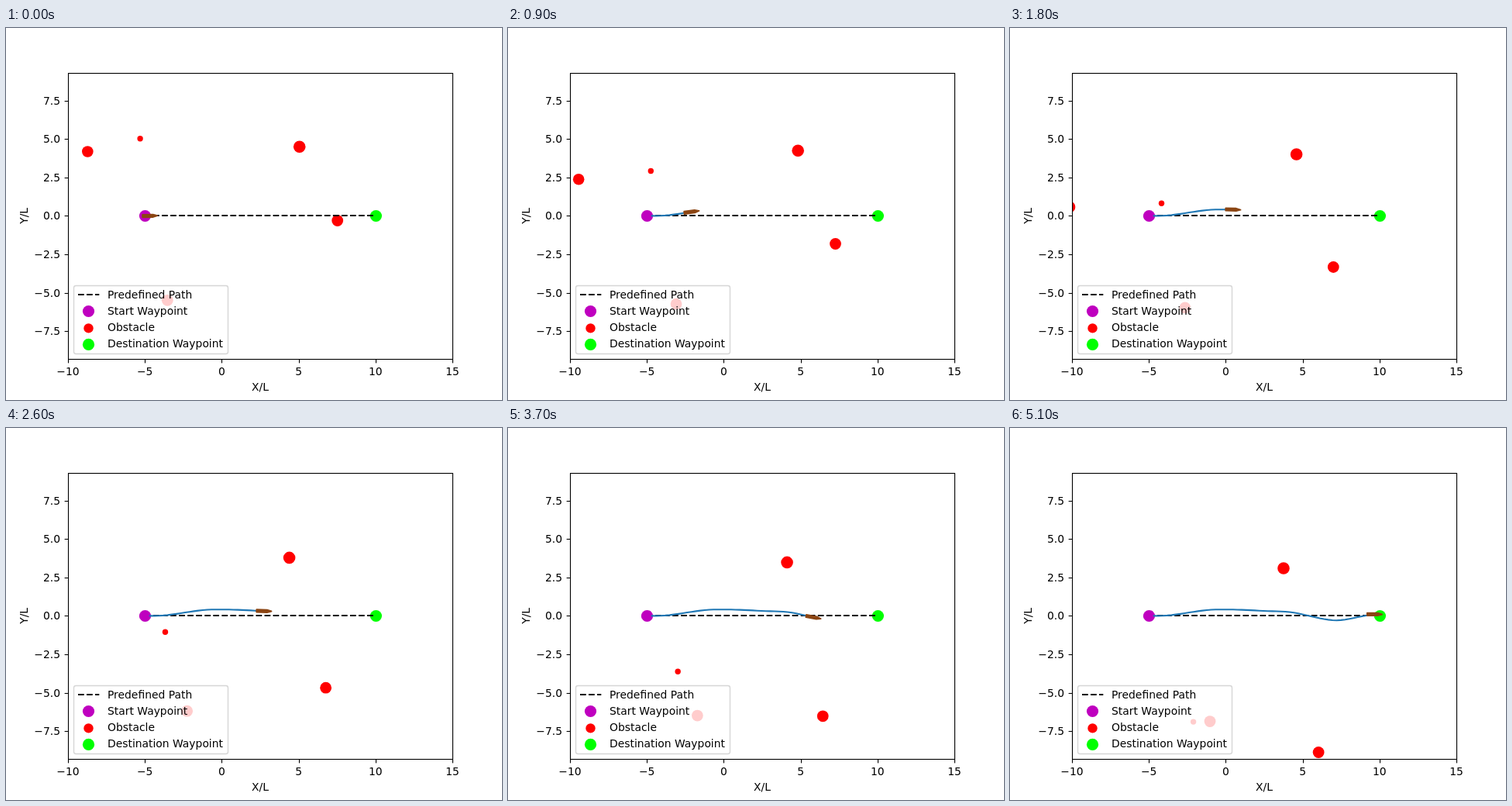
Animation of 640 by 480 pixels, one loop 5200 ms. Source, as an HTML page:

```html
<!DOCTYPE html>
<html lang="en">
<head>
<meta charset="utf-8">
<title>Path following with moving obstacles</title>
<style>
  html, body { margin: 0; width: 100%; height: 100%; overflow: hidden; background: #fff; }
  svg { display: block; width: 640px; height: 480px; }
  text { font: 13.889px "DejaVu Sans", sans-serif; fill: #000; }
  .mid { text-anchor: middle; }
  .end { text-anchor: end; }
  .line { fill: none; stroke: #000; stroke-width: 1.11; }
  .path { stroke: #000; stroke-width: 2.08; stroke-dasharray: 7.71 3.33; }
  .trail { fill: none; stroke: #1f77b4; stroke-width: 2.08; stroke-linejoin: round; stroke-linecap: square; }
  .hull { fill: #8b4513; stroke: #8b4513; stroke-width: 2; stroke-linejoin: round; }
</style>
</head>
<body>
<svg viewBox="0 0 640 480">
  <clipPath id="area"><rect x="80" y="57.6" width="496" height="369.6"/></clipPath>
  <g id="plot" clip-path="url(#area)"></g>
  <g id="axes"></g>
  <g id="legend"></g>
</svg>
<script>
const STEP = 100, STEPS = 52, UNIT = 19.84;
const RED = '#f00', PURPLE = '#bf00bf', GREEN = '#0f0';
const px = x => 278.4 + x * UNIT;
const py = y => 242.4 - y * UNIT;

// Steady drift, in pixels and pixels per step
const obstacles = [
  { x: 105.3, y: 159.5, r: 7.3, vx: -1.57, vy: 3.97 },
  { x: 173.1, y: 142.8, r: 3.7, vx: 1.245, vy: 4.633 },
  { x: 378.7, y: 153.3, r: 7.8, vx: -0.504, vy: 0.543 },
  { x: 427.7, y: 248.5, r: 7.4, vx: -0.58, vy: 3.333 },
  { x: 208.3, y: 351.3, r: 7.4, vx: 0.975, vy: 0.535 }
];

function ease(x, from, to) {
  const t = Math.min(1, Math.max(0, (x - from) / (to - from)));
  return t * t * (3 - 2 * t);
}
// Swerve out, settle, cross the line, come back to it
const course = x => 0.413 * ease(x, -4.4, -0.5) - 0.13 * ease(x, 0, 4)
  - 0.58 * ease(x, 3.6, 7.3) + 0.41 * ease(x, 7.1, 10);
// Nearly constant speed, slowing a little at the end
const shipX = n => -4.67 + 0.2865 * n - 2e-6 * n ** 3;
// The bow points where the course leads a little further on
const heading = x =>
  Math.atan2(course(x + 0.25) - course(x + 0.65), 0.4) * 180 / Math.PI;

function add(parent, tag, attrs, text) {
  const el = document.createElementNS('http://www.w3.org/2000/svg', tag);
  for (const key in attrs) el.setAttribute(key, attrs[key]);
  if (text) el.textContent = text;
  return parent.appendChild(el);
}
const dot = (parent, cx, cy, r, fill) => add(parent, 'circle', { cx, cy, r, fill });
const dashes = (parent, x1, x2, y) => add(parent, 'line', { class: 'path', x1, x2, y1: y, y2: y });
const snap = v => Math.round(v) + 0.5;
const label = v => String(v).replace('-', '\u2212');

const plot = document.getElementById('plot');
const axes = document.getElementById('axes');
const legend = document.getElementById('legend');

const dots = obstacles.map(({ x, y, r }) => dot(plot, x, y, r, RED));
dot(plot, 477.4, 242.5, 7.6, GREEN);
dashes(plot, 179, 477, 242);
dot(plot, 179.5, 242.5, 7.6, PURPLE);
const trail = add(plot, 'polyline', { class: 'trail' });
const hull = add(plot, 'path', { class: 'hull', d: 'M-9.5-1.6H4L9.6 0L4 1.6H-9.5Z' });

add(axes, 'rect', { class: 'line', x: 80.5, y: 58.5, width: 496, height: 369 });
for (let v = -10; v <= 15; v += 5) {
  add(axes, 'path', { class: 'line', d: `M${snap(px(v))} 427.5v4.9` });
  add(axes, 'text', { class: 'mid', x: px(v), y: 448 }, label(v));
}
for (let v = -7.5; v <= 7.5; v += 2.5) {
  add(axes, 'path', { class: 'line', d: `M80.5 ${snap(py(v))}h-4.9` });
  add(axes, 'text', { class: 'end', x: 70, y: Math.round(py(v) + 5) }, label(v.toFixed(1)));
}
add(axes, 'text', { class: 'mid', x: 328, y: 468 }, 'X/L');
add(axes, 'text', { class: 'mid', transform: 'translate(28 242.4) rotate(-90)' }, 'Y/L');

add(legend, 'rect', {
  x: 87.5, y: 332.5, width: 199, height: 88, rx: 2.8,
  fill: '#fff', stroke: '#ccc', 'stroke-width': 1.39, opacity: 0.8
});
dashes(legend, 93, 120.3, 344);
dot(legend, 106.5, 365.5, 7.6, PURPLE);
dot(legend, 106.5, 387.4, 6.2, RED);
dot(legend, 106.5, 408.4, 7.6, GREEN);
['Predefined Path', 'Start Waypoint', 'Obstacle', 'Destination Waypoint'].forEach((name, i) =>
  add(legend, 'text', { x: 131, y: 349 + i * 21 }, name));

function draw(n) {
  obstacles.forEach(({ x, y, vx, vy }, i) => {
    dots[i].setAttribute('cx', x + vx * n);
    dots[i].setAttribute('cy', y + vy * n);
  });
  const points = [];
  for (let i = 0; i <= n; i++) points.push([px(shipX(i)), py(course(shipX(i)))]);
  trail.setAttribute('points', points.join(' '));
  hull.setAttribute('transform', `translate(${points[n]}) rotate(${heading(shipX(n))})`);
}

let shown = -1;
const began = performance.now();
function tick() {
  const n = Math.floor((performance.now() - began) / STEP) % STEPS;
  if (n !== shown) draw(shown = n);
  requestAnimationFrame(tick);
}
tick();
</script>
</body>
</html>
```
